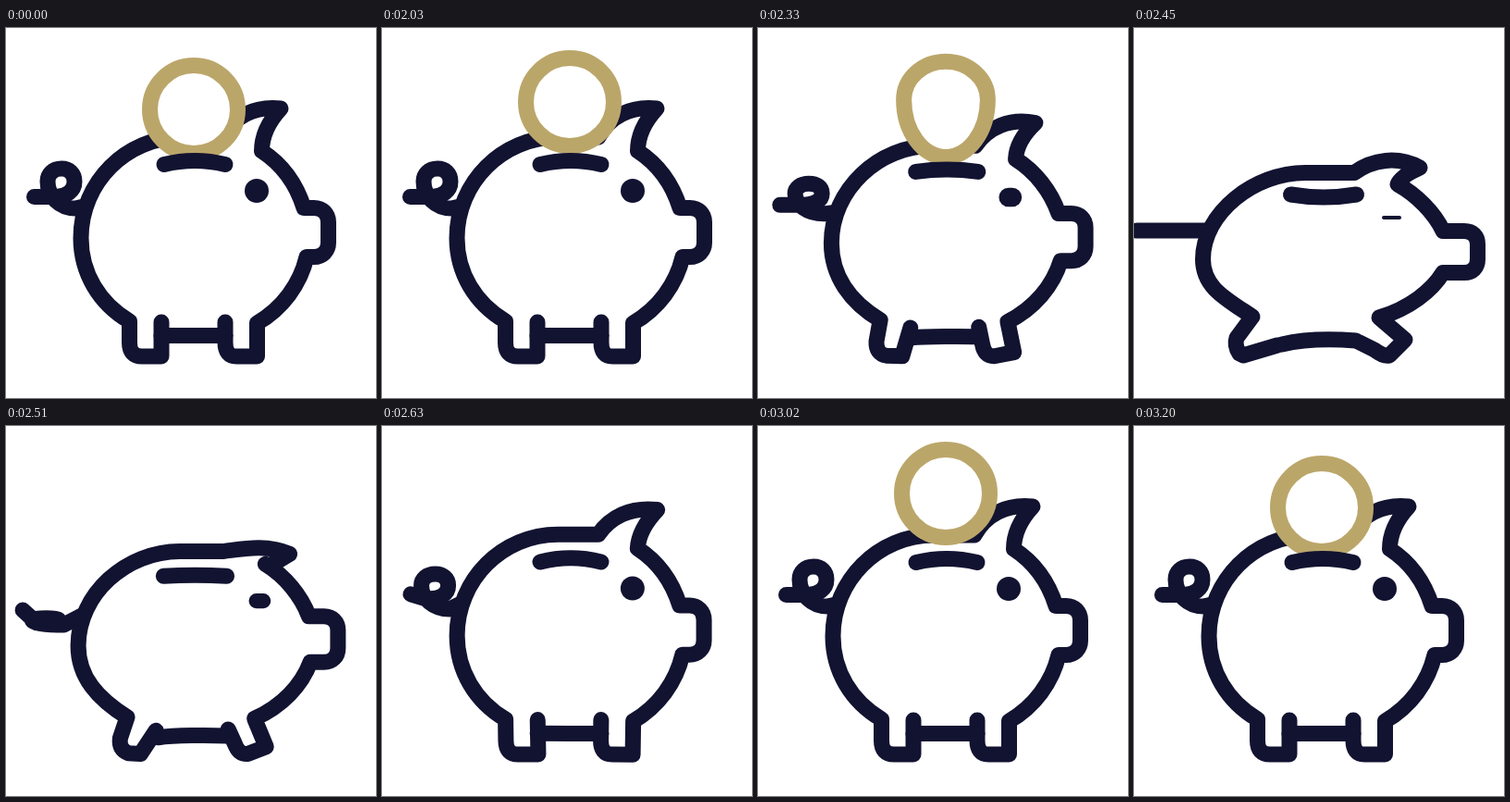
An HTML page for the animation above (3230 ms loop, 400 by 400 pixels).

```html
<!DOCTYPE html>
<html lang="en">
<head>
<meta charset="utf-8">
<title>Piggy bank</title>
<style>
  html, body { margin: 0; width: 100%; height: 100%; overflow: hidden; background: #fff; }
  svg { display: block; width: 100%; height: 100%; }
  path { fill: none; stroke: #121331; stroke-width: 17; stroke-linecap: round; stroke-linejoin: round; }
  #eye { fill: #121331; }
  #coin { fill: #fff; stroke: #bba66a; }
</style>
</head>
<body>
<svg viewBox="0 0 400 400">
  <clipPath id="above"><rect id="mask" width="400" height="146"/></clipPath>
  <path id="tail"/>
  <path id="body"/>
  <path id="belly"/>
  <rect id="eye"/>
  <g clip-path="url(#above)"><path id="coin"/></g>
  <path id="slot"/>
</svg>
<script>
const LOOP = 3230, START = 2030, STEP = 30;
const $ = id => document.getElementById(id);
const clamp = v => Math.min(1, Math.max(0, v));
const lerp = (a, b, k) => a + (b - a) * k;
const span = (t, a, b) => clamp((t - a) / (b - a));
const ease = s => s * s * (3 - 2 * s);

// Each shape: [at rest, fully squashed]
const shapes = {
  front: [
    'M237 318 L237 340 C237 350 241 355 249 355 L271.5 355 L271.5 319 C299 303 318 277 325 247.5 L333 247.5 C342 247.5 348.5 241 348.5 232 L348.5 210 C348.5 201 342 194.5 333 194.5 L322 194.5 C314 169 298 147 276.5 133',
    'M244 340 L260 348 C266 352 270 355 276 354 L293 337 L265 313 C298 303 322 284 334 264.5 L357 264.5 C366 264.5 371.5 259 371.5 250 L371.5 234 C371.5 225 366 219.5 357 219.5 L334 219.5 C325 200 305 180 285 169'
  ],
  ear: [
    'C276.5 115 285 100 297 87 C268 84 246 96',
    'C288 162 298 156 309 151 C285 138 258 142'
  ],
  back: [
    '234 118 L190 118 C130 118 81 167 81 227 C81 265 101 298 133.5 317 L133.5 340 C133.5 350 138 355 147 355 L168 355 L168 318',
    '238 156.5 L185 156.5 C130 156.5 74.5 200 74.5 250 C74.5 280 98 292 128 312 L111 335 C109 341 110 346 114 352 L118 354 L155 343'
  ],
  belly: [
    'M168 332.5 C180 332.5 225 332.5 237 332.5',
    'M160 342 C185 336 215 336 240 338'
  ],
  slot: [
    'M171 147.5 Q204 139.5 237 147.5',
    'M169.5 180 Q205 186 240.5 180'
  ],
  tip: ['M30.5 182.5', 'M3 219'],
  curl: [
    'L50 182.5 C66 182.5 74 176 74 166 C74 157 68 152 60 152 C51 152 45 158 45 166 C45 182 58 195 75 195',
    'L30 219 C46 219 54 219 54 219 C54 219 48 219 40 219 C31 219 25 219 25 219 C25 219 38 219 60 219'
  ],
  root: ['L84 193', 'L80 219']
};

function morph(name, k) {
  const [from, to] = shapes[name];
  const ends = to.match(/[\d.]+/g);
  let i = 0;
  return from.replace(/[\d.]+/g, n => lerp(+n, +ends[i++], k).toFixed(2)) + ' ';
}

function squash(t) {
  if (t < 2445) return ease(span(t, 2278, 2440));
  if (t < 2590) return lerp(1, -0.03, ease(span(t, 2450, 2565)));
  return lerp(-0.03, 0, ease(span(t, 2590, 2685)));
}

// Ear and tail go down with the body but come back later
const lag = (t, end) => t < 2445 ? squash(t) : 1 - ease(span(t, 2450, end));

function coinPath(t) {
  const x = 203;
  let y = 88, r = 47.5, squeeze = 0;
  if (t >= 2770) {
    y = 88 - 53 * Math.pow(1 - span(t, 2770, 3200), 1.44);
    r *= 1 - Math.pow(1 - span(t, 2770, 3015), 2);
  } else if (t >= 2440) {
    return '';
  } else if (t >= 2140) {
    y = 20 + 62 * Math.pow((t - 2140) / 190, 3);
    squeeze = span(t, 2300, 2400);
  } else {
    y = lerp(88, 20, ease(span(t, 2000, 2140)));
  }
  const w = r * (1 - 0.5 * squeeze * squeeze), h = w * 0.552;
  const mid = y - 15 * squeeze, top = y - r + 6 * squeeze, low = y + r + 33 * squeeze;
  const up = 0.552 * (mid - top), down = 0.552 * (low - mid);
  return `M${x} ${top} C${x + h} ${top} ${x + w} ${mid - up} ${x + w} ${mid}` +
    `C${x + w} ${mid + down} ${x + h} ${low} ${x} ${low}` +
    `C${x - h} ${low} ${x - w} ${mid + down} ${x - w} ${mid}` +
    `C${x - w} ${mid - up} ${x - h} ${top} ${x} ${top}Z`;
}

function drawEye(q) {
  const w = Math.min(26, lerp(26, 21, q)), h = Math.min(26, lerp(26, 4, q));
  const box = { x: lerp(271, 278.5, q) - w / 2, y: lerp(176, 205, q) - h / 2, width: w, height: h, rx: h / 2 };
  for (const key in box) $('eye').setAttribute(key, box[key]);
}

function draw(t) {
  const q = squash(t);
  const set = (id, d) => $(id).setAttribute('d', d);
  set('body', morph('front', q) + morph('ear', lag(t, 2660)) + morph('back', q));
  set('tail', morph('tip', q) + morph('curl', lag(t, 2680)) + morph('root', q));
  set('belly', morph('belly', q));
  set('slot', morph('slot', q));
  set('coin', coinPath(t));
  $('mask').setAttribute('height', lerp(146, 181, q));
  drawEye(q);
}

function tick() {
  const t = performance.now() % LOOP;
  draw(t < START ? 0 : START + Math.floor((t - START) / STEP) * STEP);
  requestAnimationFrame(tick);
}
tick();
</script>
</body>
</html>
```
